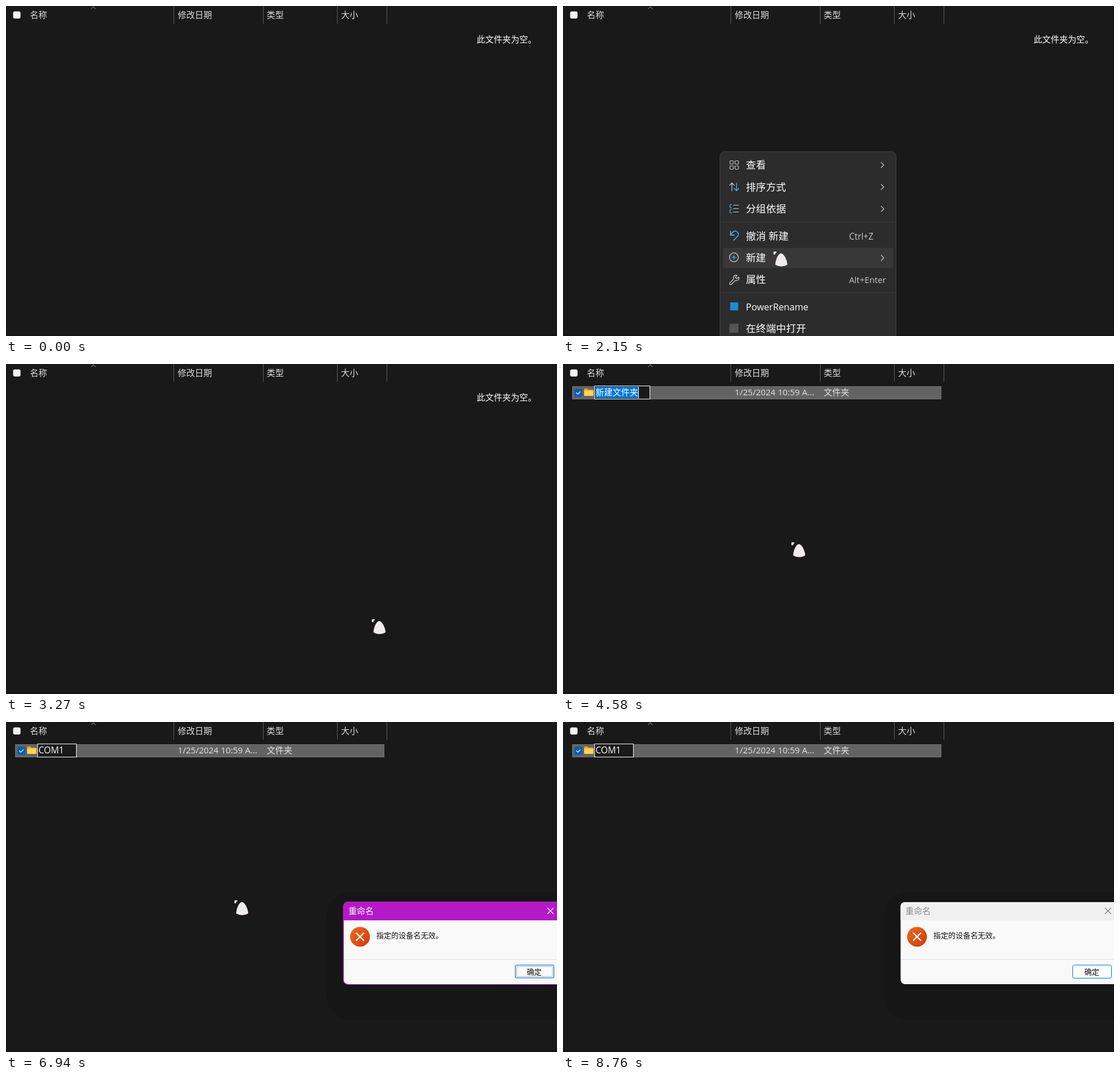
An HTML page that plays this animation: 967x579 px, repeating every 8.78 s.

```html
<!DOCTYPE html>
<html lang="zh-CN">
<head>
<meta charset="utf-8">
<title>新建文件夹</title>
<style>
html, body { margin: 0; width: 100%; height: 100%; overflow: hidden; background: #191919; }
svg { display: block; width: 100%; height: 100%; font-family: "Open Sans", "Noto Sans CJK SC", "Noto Sans CJK", sans-serif; }
text { white-space: pre; }
</style>
</head>
<body>
<svg id="stage" viewBox="0 0 967 579"></svg>
<script>
const LOOP = 8780;
const BLINK = 203;
const BLUE = '#4cc2ff';

// Cursor tip: time, x, y, easing of the way to this point
const PATH = [
  [90, 414, 562], [510, 276, 255, 'out'],
  [1550, 276, 255], [2250, 375, 441, 'both'],
  [2430, 375, 441], [2595, 383, 447, 'in'], [3050, 642, 448, 'both'],
  [3400, 642, 448], [4350, 401, 313, 'both'],
  [7400, 401, 313], [7590, 675, 418, 'in'], [7650, 750, 433], [7810, 912, 585]
];
const EASE = {
  in: p => p ** 1.6,
  out: p => 1 - (1 - p) ** 2,
  both: p => p * p * (3 - 2 * p)
};
// Name edits: time, text, right edge of the text
const EDITS = [
  [3762, '新建文件夹', 132], [5020, 'C', 67], [5200, 'CO', 80],
  [5380, 'COM', 94], [6130, 'COM1', 102]
];
const ROWS = [279, 317.5, 356, 404, 442, 480, 528, 566];
const NEW_ROW = 4;
const CLICK = 3270, MENU = 1080, SUBMENU = 2290, DIALOG = 6650, BLUR = 8760;

const rect = (x, y, w, h, fill, more = '') =>
  `<rect x="${x}" y="${y}" width="${w}" height="${h}" fill="${fill}" ${more}/>`;
const line = (d, stroke = '#d0d0d0', width = 1.2) =>
  `<path d="${d}" fill="none" stroke="${stroke}" stroke-width="${width}" stroke-linecap="round" stroke-linejoin="round"/>`;
const text = (x, y, s, size = 15, fill = '#fff', more = '') =>
  `<text x="${x}" y="${y}" font-size="${size}" fill="${fill}" ${more}>${s}</text>`;
const group = (id, body, more = '') => `<g id="${id}" ${more}>${body}</g>`;

const folder = (x, y) =>
  `<path d="M${x} ${y + 1.5}q0-1.5 1.5-1.5h4.5l2 2h7q1.5 0 1.5 1.5v3h-16.5z" fill="#e8a518"/>` +
  rect(x, y + 3.5, 16.5, 9.5, '#ffd257', 'rx="1.3"');

function header() {
  const cols = [[42, '名称'], [301.5, '修改日期'], [457.5, '类型'], [588, '大小']];
  return rect(12.5, 9.5, 13, 12.5, '#f3f3f3', 'rx="3"') +
    line('M149.5 5L153.2 1.4L157 5', '#a8a8a8', 1) +
    cols.map(([x, s]) => text(x, 21, s, 15, '#dedede')).join('') +
    [294, 451, 581, 668].map(x => rect(x, 0, 1, 31, '#5c5c5c')).join('');
}

function fileRow() {
  return rect(16.5, 39.5, 647, 22, '#636363', 'stroke="#707070"') +
    rect(20, 43.5, 14, 14, '#005fb8', 'rx="3"') +
    line('M23.5 50.5L26 53L30.5 48.5', '#fff', 1.1) +
    folder(37, 43) +
    text(301.5, 55, '1/25/2024 10:59 A...', 15.1, '#e4e4e4') +
    text(457.5, 55, '文件夹', 15, '#e4e4e4') +
    rect(55.5, 38.5, 97, 23, '#191919', 'id="box" stroke="#fff"') +
    rect(57, 40, 75, 20, '#0078d7', 'id="picked"') +
    text(57, 55, '', 15, '#fff', 'id="name"') +
    rect(132, 40, 1, 20, '#fff', 'id="caret"');
}

function menuIcons() {
  const tiles = [[293, 271.5], [302, 271.5], [293, 280.5], [302, 280.5]];
  return tiles.map(([x, y]) => rect(x, y, 6, 6, 'none', 'rx="1.5" stroke="#c8c8c8" stroke-width="1.2"')).join('') +
    line('M296.5 324V310.5M292.5 314.5L296.5 310.5L300.5 314.5') +
    line('M304.5 310.5V324M300.5 320L304.5 324L308.5 320', BLUE) +
    line('M299 349.5H308M299 355.5H308M299 361.5H308') +
    line('M296 348H294.5Q293 348 293 350V352.5Q293 354 294.5 354H296M296 357H294.5Q293 357 293 358.5V361Q293 363 294.5 363H296', BLUE) +
    line('M294 395V402H301M294.5 401.5C298 394.500 303 393.500 306 396.500C309 399.500 308 402.500 306 404.500L299.500 411', BLUE, 1.4) +
    '<circle cx="300" cy="441" r="7.8" fill="none" stroke="#d0d0d0" stroke-width="1.2"/>' +
    line('M296.500 441H303.500M300 437.500V444.500', BLUE) +
    line('M305.500 472.500C301 471 298 475 299.500 479L293 485.500C291 488 294 490 296 488L302.500 481.500C307 483 310 479 308.500 475.500L305 478.500L302.500 476z') +
    rect(293.5, 520, 14, 14, '#1c8bd6') +
    rect(292, 557.5, 16, 16, '#555');
}

function menu() {
  const names = ['查看', '排序方式', '分组依据', '撤消 新建', '新建', '属性', 'PowerRename', '在终端中打开'];
  const label = (s, i) => text(321, ROWS[i] + 6.3, s, i === 6 ? 16.2 : 17.6);
  const arrow = i => line(`M558.5 ${ROWS[i] - 4.5}l4.5 4.500l-4.500 4.500`, '#c8c8c8');
  return rect(275.5, 255.5, 309, 340, '#2c2c2c', 'rx="8" stroke="#414141"') +
    rect(281, 0, 298, 35, '#383838', 'id="hover" rx="4"') +
    rect(276, 378.5, 308, 1, '#414141') + rect(276, 502.5, 308, 1, '#414141') +
    menuIcons() + names.map(label).join('') + [0, 1, 2, NEW_ROW].map(arrow).join('') +
    text(502, 409.5, 'Ctrl+Z', 15.4, '#c8c8c8') +
    text(502, 486, 'Alt+Enter', 15.1, '#c8c8c8');
}

function submenu() {
  return rect(577, 423.5, 303.5, 170, '#2c2c2c', 'rx="8" stroke="#363636"') +
    rect(583, 427, 292, 34.5, '#383838', 'id="subHover" rx="4"') +
    folder(594, 437.5) +
    rect(594, 473.5, 16, 16, '#f4f4f4', 'rx="2"') + rect(595.5, 475, 13, 13, '#1686d9', 'rx="1"') +
    line('M598.5 485L605.5 478M600.5 478H605.500V483', '#fff', 1.6) +
    rect(594.5, 511, 15, 15, '#c0283e') +
    '<path d="M596 548.5h8l4 4v11.500h-12z" fill="#f5f5f5"/>' +
    rect(598, 553, 8, 7.5, '#1b82d2') + line('M599 559L601.500 556.500L605 559.500', '#fff', 1) +
    text(624, 450.3, '文件夹', 17.6) + text(624, 488, '快捷方式', 17.6) +
    text(624, 525, 'Norvandel Drawer Database', 16.2) +
    text(624, 562.3, 'BMP 图像', 17.6);
}

function dialog() {
  const cross = (x, c) => line(`M${x - 5} 326.500l10 10m0 -10l-10 10`, c, 1.1);
  const active = rect(592, 315.5, 400, 145, 'none', 'rx="8" stroke="#b31ac6" stroke-width="1.2"') +
    '<path d="M592 348V323.500q0-8 8-8H992V348z" fill="#b31ac6"/>' +
    text(601, 337, '重命名', 14.8) + cross(955.5, '#fff') +
    rect(894, 426.5, 67.5, 22.5, '#fafafa', 'rx="2" stroke="#3f92d2" stroke-width="1.6"') +
    rect(896.5, 429, 62.5, 17.5, 'none', 'stroke="#555" stroke-width=".8" stroke-dasharray="1 1"') +
    text(914, 442.7, '确定', 13, '#111');
  const idle = '<path d="M592.500 348V324q0-8 8-8H992V348z" fill="#f0f0f0"/>' +
    text(601, 337, '重命名', 14.8, '#8c8c8c') + cross(956.5, '#777') +
    rect(894.5, 426.5, 68, 23, '#fdfdfd', 'rx="3" stroke="#0078d4"') +
    text(915, 442.7, '确定', 13, '#111');
  return rect(592.5, 316, 400, 144, '#f9f9f9', 'rx="8"') +
    rect(593, 416, 400, 1, '#dfdfdf') +
    '<circle cx="621.3" cy="376.800" r="17.400" fill="url(#alert)"/>' +
    line('M615 370.500l12.600 12.600m0 -12.600l-12.600 12.600', '#fff', 2.2) +
    text(650, 378.5, '指定的设备名无效。', 13, '#111') +
    group('active', active) + group('idle', idle);
}

const stage = document.getElementById('stage');
stage.innerHTML =
  '<defs><linearGradient id="alert" x2="1" y2="1"><stop stop-color="#ef6a24"/><stop offset="1" stop-color="#cc3a08"/></linearGradient>' +
  '<clipPath id="menuClip"><rect id="menuCut" x="270" y="250" width="330"/></clipPath>' +
  '<clipPath id="subClip"><rect id="subCut" x="570" y="420" width="330"/></clipPath></defs>' +
  rect(0, 0, 967, 579, '#191919') + rect(0, 576, 967, 3, '#171416') +
  header() +
  text(826, 63.5, '此文件夹为空。', 15, '#fff', 'id="empty"') +
  group('file', fileRow()) +
  group('menu', menu(), 'clip-path="url(#menuClip)"') +
  group('sub', submenu(), 'clip-path="url(#subClip)"') +
  rect(563, 298, 440, 225, '#161616', 'id="shade" rx="42"') +
  group('dialog', dialog()) +
  group('cursor', '<path d="M0 0h5v2h-2v3h-3z" fill="#fff"/>' +
    '<path d="M13 3C18 3 24 15 24 23Q13.500 29 3 23C3 15 8 3 13 3Z" fill="#f1ebec"/>');

const el = {};
stage.querySelectorAll('[id]').forEach(e => el[e.id] = e);
const set = (id, attrs) => { for (const k in attrs) el[id].setAttribute(k, attrs[k]); };
const show = (id, on) => set(id, { display: on ? 'inline' : 'none' });
const ramp = (t, from, to) => Math.min(1, Math.max(0, (t - from) / (to - from)));

function cursorAt(t) {
  const i = PATH.findIndex(k => k[0] > t);
  if (i < 1) return null;
  const [t0, x0, y0] = PATH[i - 1], [t1, x1, y1, ease] = PATH[i];
  const p = ramp(t, t0, t1), q = ease ? EASE[ease](p) : p;
  return [x0 + (x1 - x0) * q, y0 + (y1 - y0) * q];
}

function drawMenus(t, tip) {
  const open = t >= MENU && t < CLICK, subOpen = open && t >= SUBMENU;
  show('menu', open);
  show('sub', subOpen);
  if (!open) return;
  const [x, y] = tip;
  const row = subOpen ? NEW_ROW : x < 281 ? -1 : ROWS.findIndex(c => Math.abs(y - c) < 18);
  show('hover', row >= 0);
  if (row >= 0) set('hover', { y: ROWS[row] - 17.5 });
  show('subHover', x >= 577);
  set('menuCut', { height: 140 + 190 * EASE.out(ramp(t, MENU, 1200)) });
  set('subCut', { height: 60 + 100 * EASE.out(ramp(t, SUBMENU, 2440)) });
}

function drawFile(t) {
  const edit = EDITS.filter(e => e[0] <= t).pop();
  show('empty', !edit);
  show('file', edit);
  if (!edit) return;
  const [start, name, end] = edit, first = edit === EDITS[0];
  el.name.textContent = name;
  set('name', { 'font-size': first ? 15 : 15.6 });
  set('box', { width: end + (first ? 20.5 : 21.5) - 55.5 });
  show('picked', first);
  set('caret', { x: end });
  show('caret', t < DIALOG && Math.floor((t - start) / BLINK) % 2 === 0);
}

function drawDialog(t) {
  const open = t >= DIALOG, idle = t >= BLUR;
  show('dialog', open);
  show('shade', open);
  if (!open) return;
  const p = EASE.out(ramp(t, DIALOG, 6900)), s = 0.9 + 0.1 * p;
  set('dialog', { opacity: p, transform: `translate(792 388) scale(${s}) translate(-792 -388)` });
  set('shade', { opacity: p });
  show('active', !idle);
  show('idle', idle);
}

function render(t) {
  const tip = cursorAt(t);
  show('cursor', tip);
  if (tip) set('cursor', { transform: `translate(${tip[0].toFixed(1)} ${tip[1].toFixed(1)})` });
  drawMenus(t, tip);
  drawFile(t);
  drawDialog(t);
}

function tick() {
  render(performance.now() % LOOP);
  requestAnimationFrame(tick);
}
tick();
</script>
</body>
</html>
```
